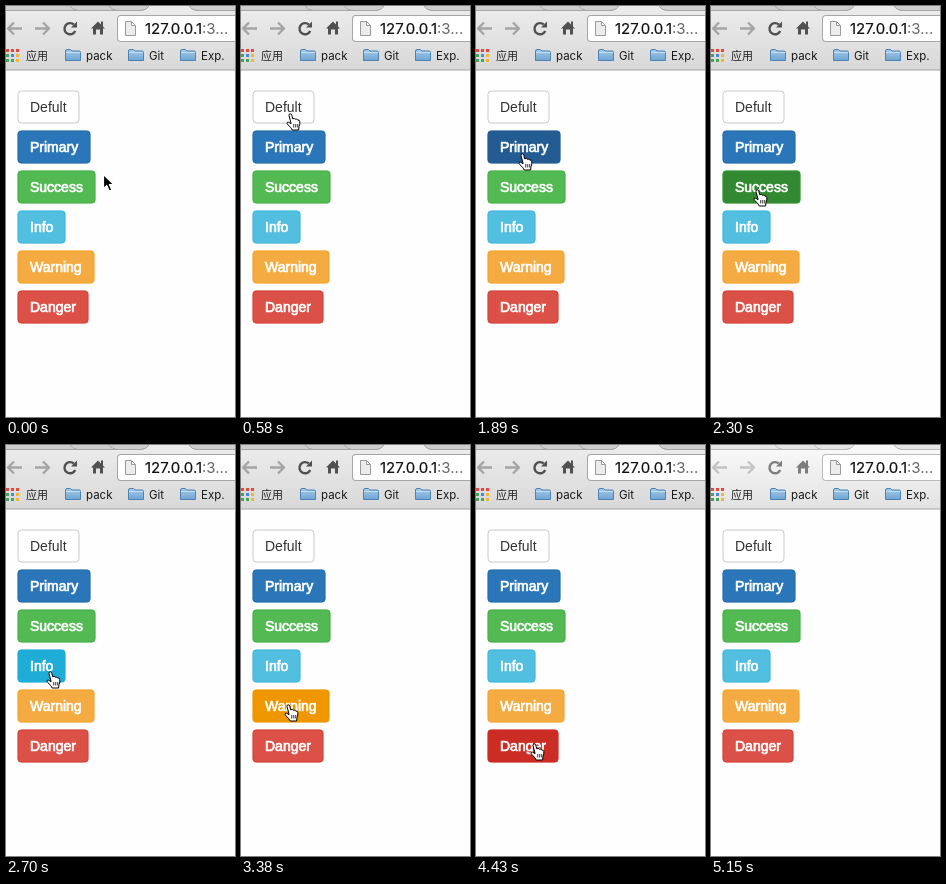
Recreate the animation shown at these times as an HTML page with a canvas. Size 229x411 px, loop 5180 ms.

```html
<!DOCTYPE html>
<html>
<head>
<meta charset="utf-8">
<style>
html, body { margin: 0; width: 100%; height: 100%; overflow: hidden; background: #fff; }
canvas { display: block; }
</style>
</head>
<body>
<canvas id="stage" width="229" height="411"></canvas>
<script>
const ctx = document.getElementById('stage').getContext('2d');
const LOOP = 5180, BLUR_AT = 5150, HOVER_LAG = 90, PRESS_TIME = 90;
const BUTTON_FONT = '14px "Liberation Sans", Arial, sans-serif';
const UI_FONT = 'Inter, "Noto Sans CJK SC", "Noto Sans CJK", sans-serif';

function textWidth(str, font) {
  ctx.font = font;
  return ctx.measureText(str).width;
}

const buttons = [
  { label: 'Defult', color: '#ffffff', hover: '#e6e6e6', pressAt: 840 },
  { label: 'Primary', color: '#2b76b9', hover: '#225c92', pressAt: 1630 },
  { label: 'Success', color: '#52b953', hover: '#3a9f3a', pressAt: 2300 },
  { label: 'Info', color: '#53bfe0', hover: '#1fadd8', pressAt: 2980 },
  { label: 'Warning', color: '#f4ac42', hover: '#ef9700', pressAt: 3710 },
  { label: 'Danger', color: '#dc5147', hover: '#cb2c24', pressAt: 4340 }
].map((b, i) => ({
  ...b, x: 11.5, y: 84.5 + 40 * i, h: 33,
  w: Math.round(textWidth(b.label, BUTTON_FONT) + 25)
}));

// The pointer glides to each stop between two times, then rests there.
const start = { x: 97, y: 168 };
const stops = [
  { from: 20, to: 610, x: 46, y: 105 },
  { from: 1200, to: 1400, x: 46, y: 142 },
  { from: 1870, to: 2030, x: 46, y: 184 },
  { from: 2490, to: 2700, x: 44, y: 227 },
  { from: 2700, to: 2830, x: 37, y: 230 },
  { from: 3210, to: 3380, x: 47, y: 260 },
  { from: 3850, to: 4110, x: 58, y: 299 },
  { from: 4530, to: 4710, x: 240, y: 430 }
];

function pointerAt(t) {
  let { x, y } = start;
  for (const s of stops) {
    const k = Math.min(1, Math.max(0, (t - s.from) / (s.to - s.from)));
    x += (s.x - x) * k;
    y += (s.y - y) * k;
  }
  return { x, y };
}

const buttonAt = ({ x, y }) =>
  buttons.find(b => x >= b.x && x <= b.x + b.w && y >= b.y - .5 && y <= b.y + b.h);

const gray = level => `rgb(${level}, ${level}, ${level})`;

function rect(x, y, w, h, fill) {
  ctx.fillStyle = fill;
  ctx.fillRect(x, y, w, h);
}

function text(str, x, baseline, font, fill, weight = 0) {
  ctx.font = font;
  ctx.fillStyle = ctx.strokeStyle = fill;
  ctx.fillText(str, x, baseline);
  if (weight) {
    ctx.lineWidth = weight;
    ctx.strokeText(str, x, baseline);
  }
}

function shape(d, x, y, fill, stroke, width = 1) {
  const path = new Path2D(d);
  ctx.save();
  ctx.translate(x, y);
  ctx.lineJoin = 'round';
  if (fill) { ctx.fillStyle = fill; ctx.fill(path); }
  if (stroke) { ctx.strokeStyle = stroke; ctx.lineWidth = width; ctx.stroke(path); }
  ctx.restore();
}

function roundBox(x, y, w, h, r, fill) {
  ctx.beginPath();
  ctx.roundRect(x, y, w, h, r);
  ctx.fillStyle = fill;
  ctx.fill();
}

function vertical(y0, y1, top, bottom) {
  const g = ctx.createLinearGradient(0, y0, 0, y1);
  g.addColorStop(0, top);
  g.addColorStop(1, bottom);
  return g;
}

function drawTabs(bar, line) {
  rect(0, 4, 229, 1, line);
  for (const x of [68, 107]) shape('M-4 0Q-1 4 4 4.5', x, 0, null, line);
  shape('M-28 5Q-22 4 -20 0H20Q22 4 28 5Z', 163, 0, bar);
  shape('M-28 4.5Q-22 4 -20 0M20 0Q22 4 28 4.5', 163, 0, null, line);
}

function drawToolbar(dim, icon, line) {
  const arrow = 'M-1 -6L-7 0L-1 6M-6 0H7';
  shape(arrow, 9, 22.5, null, dim, 2.4);
  ctx.save();
  ctx.scale(-1, 1);
  shape(arrow, -36, 22.5, null, dim, 2.4);
  ctx.restore();
  shape('M5.2 2.5A5.6 5.6 0 1 1 3.8 -4', 64, 22.5, null, icon, 2.4);
  shape('M7 -7V-1H1Z', 64, 22.5, icon);
  shape('M0 -7L7 0H5V6H2V1H-2V6H-5V0H-7ZM3 -7H5V-2L3 -4Z', 92, 22.5, icon);

  roundBox(111, 9, 140, 27, 4, line);
  roundBox(112, 10, 140, 25, 3, '#fff');
  shape('M0 0H6L10 4V14H0ZM6 0V4H10', 119.5, 15.5, '#ececec', '#9a9a9a');
  text('127.0.0.1', 139, 28, `15px ${UI_FONT}`, '#111', .2);
  text(':3...', 139 + textWidth('127.0.0.1', `15px ${UI_FONT}`), 28, `15px ${UI_FONT}`, '#666');
}

function drawBookmarks() {
  const dotColors = { r: '#e8453c', g: '#42a65a', b: '#4a86e8', y: '#f5b62e' };
  ['rrr', 'gby', 'ggy'].forEach((row, j) =>
    [...row].forEach((c, i) => rect(i * 5, 43 + j * 5, 3, 3, dotColors[c])));
  text('应用', 20, 54, `11px ${UI_FONT}`, '#222');

  const font = `11.5px ${UI_FONT}`;
  let x = 59;
  for (const label of ['pack', 'Git', 'Exp.']) {
    shape('M.5 11.5V2Q.5.5 2 .5H5.5L7 2H14Q15.5 2 15.5 3.5V11.5Z', x, 43,
      vertical(0, 12, '#a9cdea', '#6ca3d0'), '#4c82b3');
    rect(x + 1, 46, 14, 1, '#c5e0f4');
    text(label, x + 21, 54, font, '#1a1a1a');
    x = Math.round(x + 37 + textWidth(label, font));
  }
}

function drawBrowser(active) {
  const tone = (on, off) => gray(active ? on : off);
  const bar = tone(235, 248), line = tone(166, 186);
  rect(0, 0, 229, 5, tone(205, 229));
  rect(0, 5, 229, 59, vertical(5, 64, bar, tone(216, 226)));
  rect(0, 63.5, 229, 1, gray(165));
  drawTabs(bar, line);
  drawToolbar(tone(165, 196), tone(80, 125), line);
  drawBookmarks();
}

function drawButton({ x, y, w, h, label, color, hover }, hovered, pressed) {
  const plain = color === '#ffffff';
  roundBox(x, y, w, h, 4, hovered ? hover : color);
  if (hovered && pressed) roundBox(x, y, w, h, 4, 'rgba(0, 0, 0, .14)');
  ctx.beginPath();
  ctx.roundRect(x + .5, y + .5, w - 1, h - 1, 3.5);
  ctx.strokeStyle = plain ? gray(hovered ? 173 : 200) : hover + '70';
  ctx.lineWidth = 1;
  ctx.stroke();
  text(label, 24, y + 21.5, BUTTON_FONT, plain ? '#333' : '#fff', plain ? 0 : .7);
}

function drawPointer({ x, y }, isHand) {
  x = Math.round(x);
  y = Math.round(y);
  if (isHand) {
    shape('M5 10L3 2.6Q2.8.8 4.2.8Q5.5.8 5.8 2.2L6.7 5.8Q8.6 4.8 9.2 6.2Q11 5.4 11.6 7Q13.6 6.6 13.8 8.6Q14.2 11 13 13.6L12.6 17H6.2Q5.6 14.8 1.8 11.6Q.4 10 1.4 9.2Q2.4 8.4 5 10.8Z',
      x - 4, y - 1, '#fff', '#000');
    for (let i = 0; i < 3; i++) rect(x + 3.4 + 2 * i, y + 10, .8, 3.5, '#000');
  } else {
    shape('M.5 .5V14.5L3.8 11.5L6.2 17L8.8 16L6.4 10.5H10.8Z', x, y, '#000', '#fff', 1.2);
  }
}

function draw(t) {
  const pointer = pointerAt(t);
  const hovered = buttonAt(pointerAt(t - HOVER_LAG));
  rect(0, 0, 229, 411, '#fefefe');
  drawBrowser(t < BLUR_AT);
  for (const b of buttons) {
    drawButton(b, b === hovered, t >= b.pressAt && t < b.pressAt + PRESS_TIME);
  }
  drawPointer(pointer, buttonAt(pointer));
}

function tick() {
  draw(performance.now() % LOOP);
  requestAnimationFrame(tick);
}
tick();
</script>
</body>
</html>
```
